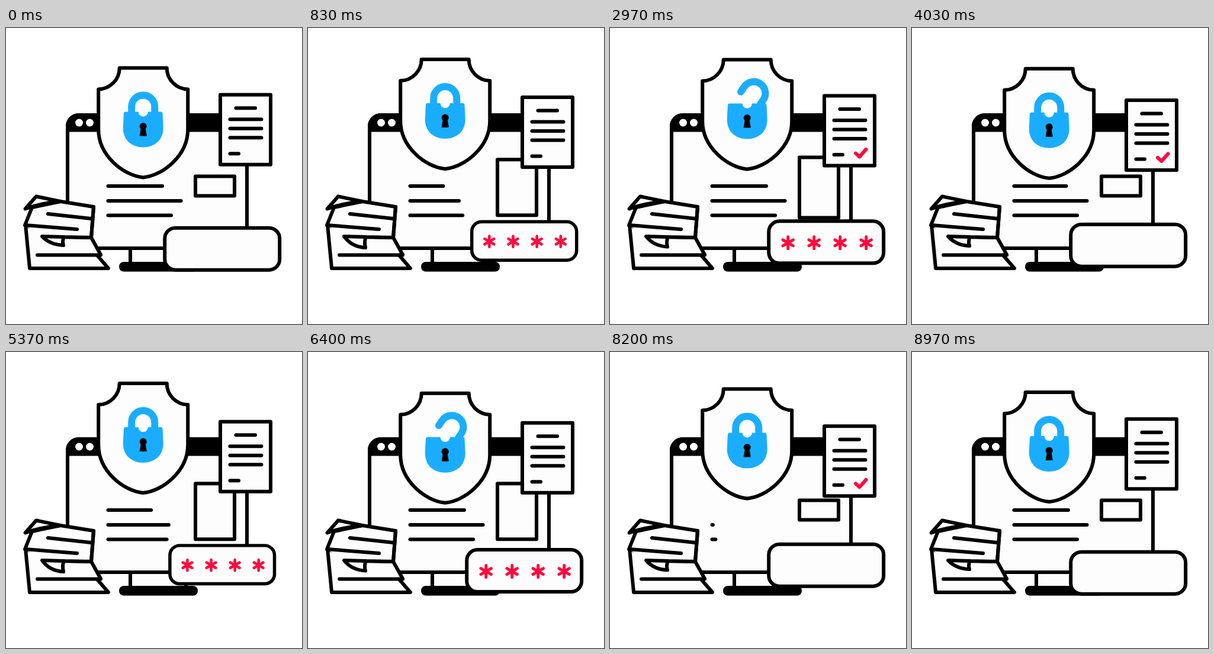
Recreate the animation shown at these times as an HTML page. Size 500 px wide and 500 px high, loop 9.01 s.

```html
<!DOCTYPE html>
<html lang="en">
<head>
<meta charset="utf-8">
<title>Secure desk</title>
<style>
  html, body { margin: 0; width: 100%; height: 100%; overflow: hidden; background: #fff; }
  svg { display: block; width: 100vw; height: 100vh; }
  .ink { fill: #fdfdfd; stroke: #000; stroke-width: 6; stroke-linejoin: round; stroke-linecap: round; }
  .line { fill: none; stroke: #000; stroke-width: 6; stroke-linejoin: round; stroke-linecap: round; }
  .blue { fill: #1aadff; }
  .red { fill: none; stroke: #ff0a3c; stroke-width: 5; stroke-linejoin: round; stroke-linecap: round; }
</style>
</head>
<body>
<svg viewBox="0 0 500 500">
  <!-- monitor -->
  <rect class="ink" x="210" y="372" width="94" height="28"/>
  <rect x="191" y="395" width="133" height="16.5" rx="8"/>
  <path class="ink" d="M104 372V166A19 19 0 0 1 123 147H388A19 19 0 0 1 407 166V372Z"/>
  <path d="M101 175.500V166A22 22 0 0 1 123 144H388A22 22 0 0 1 410 166V175.500Z"/>
  <circle cx="123.500" cy="160" r="6.500" fill="#fff"/>
  <circle cx="141.500" cy="160" r="6.500" fill="#fff"/>
  <g id="rows"></g>
  <rect id="box" class="ink" x="320" width="66"/>

  <!-- crumpled paper -->
  <path class="ink" d="M33 333L144 354L160 383L154 384L173 406H40Z"/>
  <path class="ink" d="M44 303L92 293L148 302L144 354L100 353L32 333Z"/>
  <path d="M36 336L61 352L141 354L122 340Z" fill="#fdfdfd"/>
  <path class="ink" d="M32.500 305.500L51 284.500L92 293Q62 295 32.500 305.500Z"/>
  <path class="line" d="M71 314L144 322M33 333L120 340M53 383.500H160M148 302L144 354"/>
  <path id="flap" class="ink"/>

  <!-- shield and lock -->
  <g id="bob">
    <path id="shield" class="ink" d="M-40 -92H40A36 36 0 0 0 75.500 -56V12C75.500 56 33 90 0 93C-33 90 -75.500 56 -75.500 12V-56A36 36 0 0 0 -40 -92Z"/>
    <path id="shackle" d="M-19.500 -16V-26.500A19.500 19.500 0 0 1 19.500 -26.500V-18" fill="none" stroke="#1aadff" stroke-width="12" stroke-linecap="round"/>
    <path class="blue" d="M-30 -18H-8A8 8 0 0 0 8 -18H30Q32.500 -18 32.800 -15L34 9C34 30 19 42 0 42S-34 30 -34 9L-32.800 -15Q-32.500 -18 -30 -18Z"/>
    <path d="M-8 -18A8 8 0 0 0 8 -18Z" fill="#fdfdfd"/>
    <circle cy="6.500" r="6"/>
    <path d="M-2.500 8H2.500L5 22H-5Z" stroke="#000" stroke-width="2" stroke-linejoin="round"/>
  </g>

  <!-- document -->
  <g id="doc">
    <rect class="ink" x="362" y="0" width="85" height="118"/>
    <path class="line" d="M388.500 22.500H421M378.500 41.500H431.500M378.500 57H431.500M378.500 72.500H431.500M378.500 99.500H393"/>
    <path id="check" class="red" style="stroke-width:6" pathLength="1" stroke-dasharray="1 2" d="M415 97L421.500 103L432.500 90.500"/>
  </g>

  <!-- password field -->
  <g id="field">
    <rect class="ink" x="-97" y="-35.500" width="194" height="71" rx="18"/>
    <g id="stars"></g>
  </g>
</svg>
<script>
const LOOP = 9010, CYCLE = LOOP / 2, SWAY = CYCLE / 2;
const el = id => document.getElementById(id);
const add = (parent, cls) => {
  const p = document.createElementNS('http://www.w3.org/2000/svg', 'path');
  p.setAttribute('class', cls);
  return parent.appendChild(p);
};
const set = (node, name, value) => node.setAttribute(name, value);
const ease = u => u < .5 ? 4 * u ** 3 : 1 - 4 * (1 - u) ** 3;
const soft = u => (1 - Math.cos(Math.PI * u)) / 2;

// Value at time t along [time, value] keys
function track(t, keys, curve = soft) {
  if (t <= keys[0][0]) return keys[0][1];
  for (let i = 1; i < keys.length; i++) {
    const [a, from] = keys[i - 1], [b, to] = keys[i];
    if (t <= b) return from + (to - from) * curve((t - a) / (b - a));
  }
  return keys[keys.length - 1][1];
}
const sway = (t, mid, amp, peak) => mid + amp * Math.cos(2 * Math.PI * (t - peak) / SWAY);

const rows = [
  { y: 267, len: 91.5, starts: [615, 3716] },
  { y: 292, len: 123, starts: [605, 3640] },
  { y: 316.5, len: 106.5, starts: [570, 3600] }
].map(r => ({
  ...r,
  node: add(el('rows'), 'line'),
  keys: r.starts.flatMap(s => [[s - 350, 1], [s - 50, 0], [s, 0], [s + 400, 1]])
}));

const stars = [0, 1, 2, 3].map(i => {
  const node = add(el('stars'), 'red');
  set(node, 'd', 'M0 -10V10M-8.7 -5L8.7 5M-8.7 5L8.7 -5');
  const on = 150 + 120 * i, off = 3500 - 130 * i;
  return { node, x: -64.5 + 44 * i, keys: [[on, 0], [on + 120, 1], [off, 1], [off + 120, 0]] };
});

const boxKeys = [[300, 33], [620, 103], [800, 94], [2820, 94], [2970, 102], [3350, 29], [3500, 33]];
const fieldKeys = [[640, 1], [855, .91], [1110, 1.07], [1350, 1]];
const shieldKeys = [[1400, 1], [1650, 1.027], [1900, 1]];
const openKeys = [[1300, 0], [1560, 1], [3250, 1], [3550, 0]];
const checkKeys = [[2000, 0], [2300, 1], [4120, 1], [4350, 0]];
const flapKeys = [[0, 367], [865, 371], [1670, 369.5], [2970, 369.5], [4030, 368], [CYCLE, 367]];

function draw(t) {
  for (const r of rows) {
    const f = track(t, r.keys, ease);
    set(r.node, 'd', `M172.5 ${r.y}h${r.len * f}`);
    set(r.node, 'visibility', f > .01 ? 'visible' : 'hidden');
  }

  const h = track(t, boxKeys);
  set(el('box'), 'height', h);
  set(el('box'), 'y', 267 + (h - 33) / 28 - h / 2);

  const tip = track(t, flapKeys);
  set(el('flap'), 'd', `M144 354L98 353L61 352Q74 ${tip - 1} 97 ${tip}Q94.5 360 98 353`);

  set(el('bob'), 'transform', `translate(231.7 ${sway(t, 153.5, 8.5, 840 + SWAY / 2)})`);
  set(el('shield'), 'transform', `scale(${track(t, shieldKeys)})`);
  const open = track(t, openKeys);
  set(el('shackle'), 'transform', `translate(${2.8 * open} ${open}) rotate(${35 * open} 19.5 -18)`);

  set(el('doc'), 'transform', `translate(0 ${sway(t, 117.7, 7.6, 1432)})`);
  const drawn = track(t, checkKeys);
  set(el('check'), 'stroke-dashoffset', 1 - drawn);
  set(el('check'), 'visibility', drawn > .01 ? 'visible' : 'hidden');

  set(el('field'), 'transform', `translate(365.2 ${sway(t, 365.2, 8, 0)}) scale(${track(t, fieldKeys)})`);
  for (const s of stars) {
    set(s.node, 'transform', `translate(${s.x} 1) scale(${track(t, s.keys)})`);
  }
}

const begin = performance.now();
function tick() {
  draw(((performance.now() - begin) % LOOP) % CYCLE);
  requestAnimationFrame(tick);
}
tick();
</script>
</body>
</html>
```
